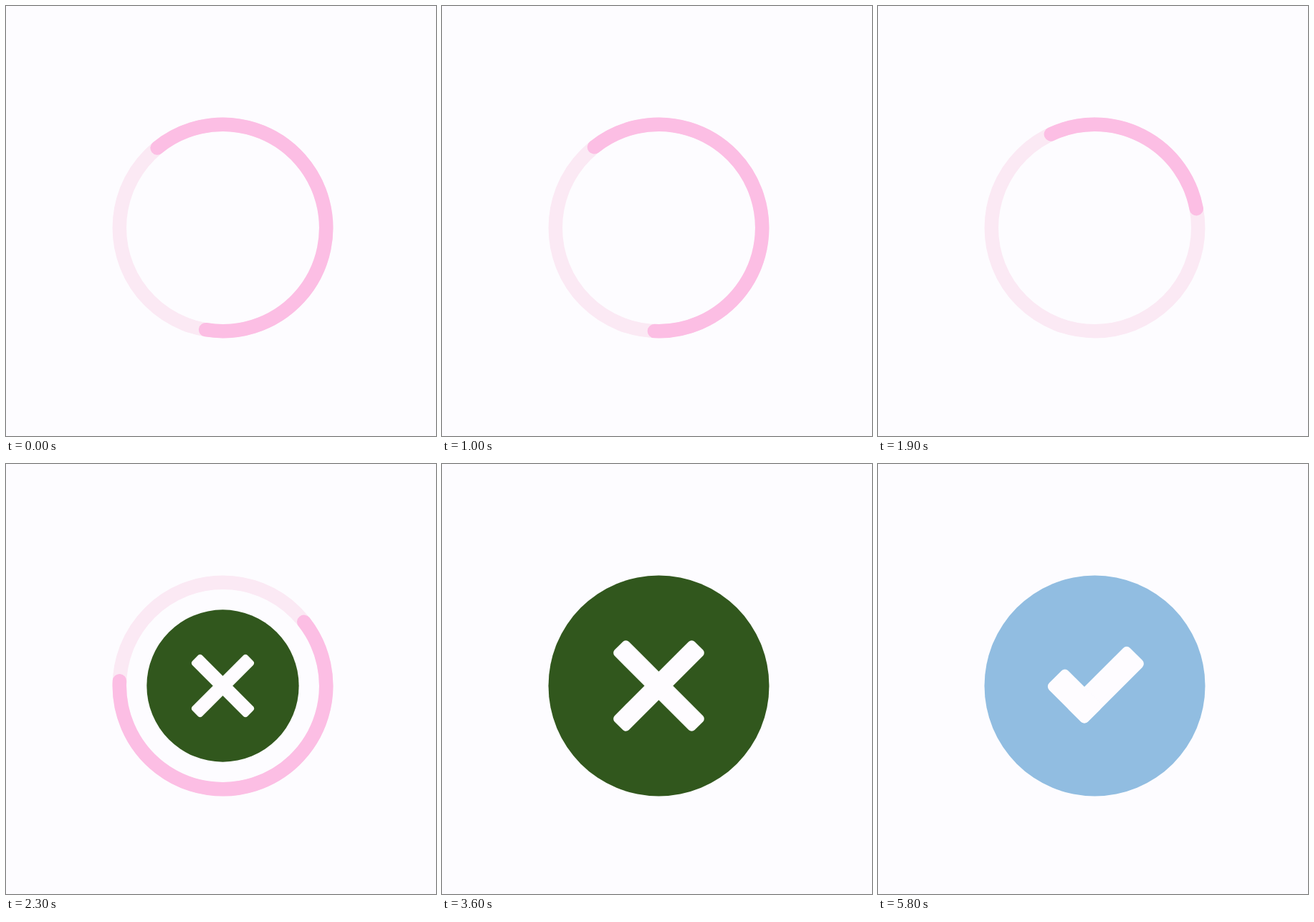
Write an HTML page that moves like this. It is 600 by 600 pixels and loops after 5900 ms.

```html
<!DOCTYPE html>
<html lang="en">
<head>
<meta charset="utf-8">
<title>Loading states</title>
<style>
  html, body { margin: 0; width: 100%; height: 100%; overflow: hidden; background: #fdfcff; }
  svg { display: block; width: 100vw; height: 100vh; }
</style>
</head>
<body>
<svg viewBox="0 0 600 600">
  <g transform="translate(302.5 309.5)">
    <g id="spinner" fill="none" stroke-width="19.5" stroke-linecap="round">
      <circle r="144.2" stroke="#fbe9f4"/>
      <path id="arc" stroke="#fcbee4"/>
    </g>
    <g id="cross">
      <circle r="154" fill="#31571d"/>
      <g fill="#fefcff">
        <rect x="-79" y="-14.1" width="158" height="28.2" rx="6" transform="rotate(45)"/>
        <rect x="-79" y="-14.1" width="158" height="28.2" rx="6" transform="rotate(-45)"/>
      </g>
    </g>
    <g id="check">
      <circle r="154" fill="#91bde1"/>
      <g fill="#fefcff" transform="translate(-14.5 55) rotate(-45)">
        <rect y="-37.9" width="121.3" height="37.9" rx="7"/>
        <rect y="-76.4" width="37.9" height="76.4" rx="7"/>
      </g>
    </g>
  </g>
</svg>
<script>
const LOOP = 5900, TURN = 1010, RADIUS = 144.2;
const byId = id => document.getElementById(id);
const spinner = byId('spinner'), arc = byId('arc'), cross = byId('cross'), check = byId('check');

// [ms, degrees clockwise from the top]; each turn adds 360 degrees
const HEAD = [[0, 189], [130, 250], [280, 272.6], [500, 288], [700, 328], [890, 438.6], [1000, 541.5]];
const TAIL = [[0, -39.4], [100, -30], [280, 51.2], [500, 210], [700, 312], [800, 336], [890, 335], [1000, 321.5]];

function keyAt(keys, i) {
  const turns = Math.floor(i / keys.length);
  const [t, v] = keys[i - turns * keys.length];
  return [t + turns * TURN, v + turns * 360];
}

function slope(keys, i) {
  const a = keyAt(keys, i - 1), b = keyAt(keys, i + 1);
  return (b[1] - a[1]) / (b[0] - a[0]);
}

// Smooth periodic curve through the keys
function angleAt(keys, t) {
  let i = 0;
  while (keyAt(keys, i + 1)[0] <= t) i++;
  const [t0, v0] = keyAt(keys, i), [t1, v1] = keyAt(keys, i + 1);
  const d = t1 - t0, u = (t - t0) / d, w = 1 - u;
  return w * w * (1 + 2 * u) * v0 + u * u * (3 - 2 * u) * v1 +
    d * u * w * (w * slope(keys, i) - u * slope(keys, i + 1));
}

function point(deg) {
  const a = deg * Math.PI / 180;
  return `${(RADIUS * Math.sin(a)).toFixed(2)} ${(-RADIUS * Math.cos(a)).toFixed(2)}`;
}

function grow(t, start) {
  const p = Math.min(1, Math.max(0, (t - start) / 525));
  return p < 0.5 ? 4 * p ** 3 : 1 - 4 * (1 - p) ** 3;
}

function setScale(el, s) {
  el.setAttribute('transform', `scale(${s})`);
  el.style.display = s > 0 ? '' : 'none';
}

function draw(t) {
  const crossSize = grow(t, 2000), checkSize = grow(t, 4580);
  const head = angleAt(HEAD, t % TURN), tail = angleAt(TAIL, t % TURN);
  const large = head - tail > 180 ? 1 : 0;
  arc.setAttribute('d', `M${point(tail)}A${RADIUS} ${RADIUS} 0 ${large} 1 ${point(head)}`);
  spinner.style.display = crossSize < 1 ? '' : 'none';
  setScale(cross, checkSize < 1 ? crossSize : 0);
  setScale(check, checkSize);
}

const began = performance.now();
function tick() {
  draw((performance.now() - began) % LOOP);
  requestAnimationFrame(tick);
}
draw(0);
requestAnimationFrame(tick);
</script>
</body>
</html>
```
